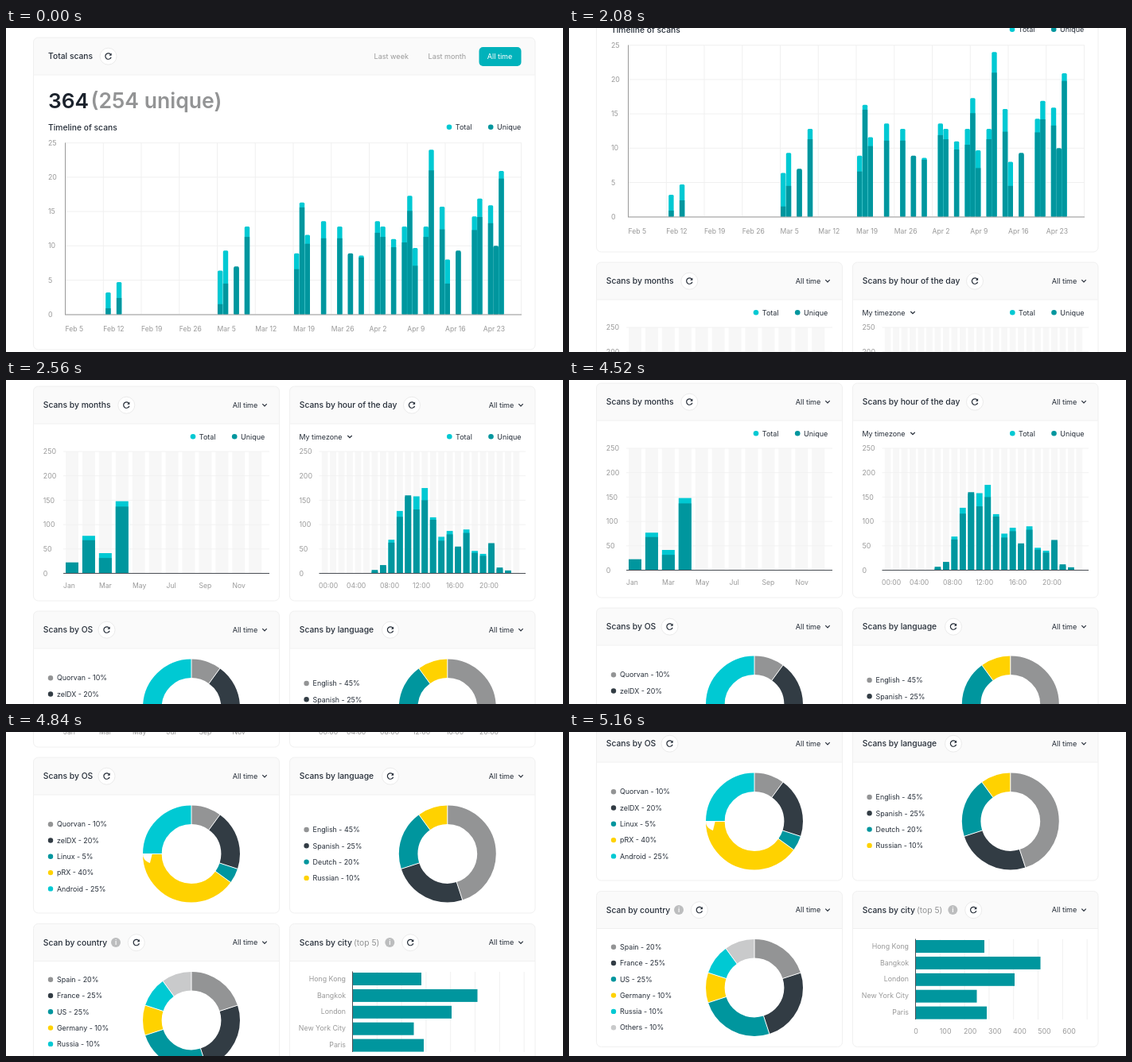
An HTML page for the animation above (6.72 s loop, 700 by 408 pixels).

```html
<!DOCTYPE html>
<html lang="en">
<head>
<meta charset="utf-8">
<title>Scan statistics</title>
<style>
  html, body { margin: 0; width: 100%; height: 100%; overflow: hidden; background: #fff; }
  svg { display: block; width: 700px; height: 408px; }
  text { font-family: Inter, "Open Sans", sans-serif; white-space: pre; }
</style>
</head>
<body>
<svg viewBox="0 0 700 408"><g id="page"></g></svg>
<script>
const CYAN = '#00c9d3', TEAL = '#00969e', YELLOW = '#ffd200', GRAY = '#939495',
      DARK = '#323c44', LIGHT = '#c9cacb', INK = '#252d38', LABEL = '#999', GRID = '#f0f0f0';
const PALETTE = [GRAY, DARK, TEAL, YELLOW, CYAN, LIGHT];
const page = document.getElementById('page');

function add(tag, attrs, content = '') {
  const el = document.createElementNS('http://www.w3.org/2000/svg', tag);
  for (const key in attrs) el.setAttribute(key, attrs[key]);
  el.textContent = content;
  page.append(el);
}
const rect = (x, y, width, height, fill, rx = 0) => add('rect', { x, y, width, height, fill, rx });
const circle = (cx, cy, r, fill, stroke = 'none') => add('circle', { cx, cy, r, fill, stroke });
const path = (d, stroke, width = 1, fill = 'none') => add('path', { d, stroke, fill, 'stroke-width': width });
const hline = (x1, x2, y, color) => path(`M${x1} ${y}H${x2}`, color);
const vline = (x, y1, y2, color) => path(`M${x} ${y1}V${y2}`, color);

// y is the middle of the capitals
function text(content, x, y, fill = LABEL, size = 8.8, weight = 400, anchor = 'start') {
  add('text', { x, y: y + size * 0.36, fill, 'font-size': size, 'font-weight': weight, 'text-anchor': anchor }, content);
}
const title = (content, x, y) => text(content, x, y, INK, 10.3, 500);

function chevron(x, y) {
  path(`M${x - 2.7} ${y - 1.3}l2.7 2.7l2.7 -2.7`, INK, 1.2);
}

function refresh(x, y) {
  circle(x, y, 10.5, '#fff', '#ebebeb');
  path(`M${x + 3.4} ${y - 1.8}A3.7 3.7 0 1 0 ${x + 3.6} ${y + 1}`, INK, 1.2);
  path(`M${x + 4.1} ${y - 4.2}v3.2h-3.2z`, 'none', 0, INK);
}

function info(x, y) {
  circle(x, y, 6, '#bcbdbe');
  text('i', x, y, '#fff', 8.5, 600, 'middle');
}

function card(x, y, width, height, name, refreshX) {
  rect(x, y, width, height, '#fff', 6);
  path(`M${x} ${y + 47}v-41q0 -6 6 -6h${width - 12}q6 0 6 6v41z`, 'none', 0, '#fafafa');
  hline(x, x + width, y + 47, GRID);
  add('rect', { x, y, width, height, rx: 6, fill: 'none', stroke: GRID });
  title(name, x + (width > 400 ? 18.5 : 12.3), y + 23.7);
  refresh(refreshX, y + 23.7);
}

function smallCard(right, y, height, name, refreshX) {
  const x = right ? 356.5 : 34.5;
  card(x, y, right ? 308.5 : 309, height, name, refreshX);
  text('All time', x + 250.2, y + 23.5, INK, 9.1);
  chevron(x + 290.5, y + 23.5);
}

function legend(x, y) {
  [['Total', CYAN], ['Unique', TEAL]].forEach(([name, color], i) => {
    circle(x + i * 52.2, y, 3.3, color);
    text(name, x + 7.8 + i * 52.2, y, INK, 9);
  });
}

function bar(x, base, width, total, unique, scale, radius) {
  rect(x, base - total * scale, width, total * scale, total > unique ? CYAN : TEAL, radius);
  rect(x, base - unique * scale + (total > unique ? 0 : 2), width,
       unique * scale - (total > unique ? 0 : 2), TEAL);
}

function timeline() {
  card(34.5, 12, 630.5, 393, 'Total scans', 128.5);
  text('Last week', 462.5, 35.7, LABEL, 9.1);
  text('Last month', 530.5, 35.7, LABEL, 9.1);
  rect(594.5, 24, 53, 24, '#00b2bb', 5);
  text('All time', 604.7, 35.7, '#fff', 9.1);
  text('364', 53, 91.5, '#1b222c', 26.3, 600);
  text('(254 unique)', 106.5, 91.5, GRAY, 26.6, 600);
  title('Timeline of scans', 53, 125);
  legend(557, 124.7);
  for (let i = 0; i <= 5; i++) {
    const y = 360.7 - i * 43.2;
    hline(74.5, 648, y, GRID);
    text(i * 5, 53, y);
  }
  const days = ['Feb 5', 'Feb 12', 'Feb 19', 'Feb 26', 'Mar 5', 'Mar 12',
                'Mar 19', 'Mar 26', 'Apr 2', 'Apr 9', 'Apr 16', 'Apr 23'];
  for (let i = 0; i <= 12; i++) {
    const x = 74.5 + i * 47.75;
    vline(x, 144.7, 360.7, GRID);
    if (days[i]) text(days[i], x, 379, LABEL, 8.6);
  }
  // left edge, total, unique
  const bars = [
    [125.2, 3.2, .9], [138.9, 4.7, 2.4], [266, 6.4, 1.5], [272.8, 9.3, 4.5], [286.3, 7, 7],
    [299.8, 12.8, 11.3], [362, 8.9, 6.6], [368.8, 16.3, 15.6], [375.6, 11.6, 10.3],
    [395.9, 13.6, 11.1], [416.2, 12.8, 11.1], [429.7, 8.9, 8.9], [443.3, 8.6, 8.3],
    [463.6, 13.6, 11.9], [470.4, 12.8, 11.3], [483.9, 11, 9.8], [497.5, 12.8, 10.5],
    [504.2, 17.3, 15.1], [511, 9.7, 7.1], [524.6, 12.8, 11.3], [531.3, 24, 21],
    [544.9, 15.7, 12.4], [551.6, 8, 4.5], [565.2, 9.3, 9.3], [585.5, 14.3, 12.3],
    [592.2, 16.9, 14.2], [605.8, 15.9, 13.3], [612.5, 10, 10], [619.3, 20.9, 19.8]
  ];
  for (const [x, total, unique] of bars) bar(x, 360.7, 6.4, total, unique, 8.64, 1.5);
  vline(74.5, 144.5, 361, '#999');
  hline(74, 648, 361, '#999');
}

function columnChart({ left, right, labelX, start, pitch, width, count, first, bars, ticks, tickX }) {
  const base = 653.5, scale = 0.614;
  for (let i = 0; i < count; i++) rect(start + i * pitch, base - 153.5, width, 153.5, '#f7f7f7');
  for (let i = 0; i <= 5; i++) {
    const y = base - i * 50 * scale;
    hline(left, right, y, '#f2f2f2');
    text(i * 50, labelX, y);
  }
  bars.forEach(([total, unique = total], i) =>
    bar(start + (first + i) * pitch, base, width, total, unique, scale, 0));
  hline(left, right, base, '#4a4f55');
  ticks.forEach((tick, i) => text(tick, tickX[i], 668.5, LABEL, 8.6));
}

function donut(cx, cy, shares) {
  const mid = 49.2, ring = 23.6;
  let sum = 0;
  const cuts = shares.map((share, i) => {
    add('circle', {
      cx, cy, r: mid, fill: 'none', stroke: PALETTE[i], 'stroke-width': ring, pathLength: 100,
      'stroke-dasharray': `${share} ${100 - share}`, 'stroke-dashoffset': -sum,
      transform: `rotate(-90 ${cx} ${cy})`
    });
    const angle = sum * Math.PI / 50;
    sum += share;
    const point = r => `${cx + r * Math.sin(angle)} ${cy - r * Math.cos(angle)}`;
    return `M${point(37)}L${point(61.5)}`;
  });
  path(cuts.join(''), '#fff');
}

function donutPanel(x, legendY, cx, cy, items) {
  items.forEach(([name, share], i) => {
    const y = legendY + i * 20.3;
    circle(x, y, 3.2, PALETTE[i]);
    text(`${name} - ${share}%`, x + 8, y, INK, 8.9);
  });
  donut(cx, cy, items.map(item => item[1]));
}

function cityChart() {
  for (let i = 0; i <= 7; i++) vline(435.5 + i * 30.8, 971, 1072, GRID);
  [['Hong Kong', 86.5], ['Bangkok', 157], ['London', 124.5], ['New York City', 77], ['Paris', 89.5]]
    .forEach(([city, width], i) => {
      const y = 980 + i * 20.9;
      rect(435.5, y - 8, width, 16, TEAL);
      text(city, 427, y - .5, LABEL, 8.8, 400, 'end');
    });
  vline(435.5, 970.5, 1072, '#4a4f55');
  for (let i = 0; i <= 6; i++) text(i * 100, i ? 442 + i * 31.1 : 436, 1087, LABEL, 8.8, 400, 'middle');
}

timeline();

smallCard(false, 418, 270, 'Scans by months', 151.3);
legend(235, 481.3);
columnChart({
  left: 72, right: 331, labelX: 46.8, start: 75, pitch: 20.93, width: 16, count: 12, first: 0,
  bars: [[22.5], [77, 68], [41.5, 31.5], [148, 137]],
  ticks: ['Jan', 'Mar', 'May', 'Jul', 'Sep', 'Nov'], tickX: [72, 117, 159, 201.5, 242.5, 284.5]
});

smallCard(true, 418, 270, 'Scans by hour of the day', 510);
text('My timezone', 368.5, 481.3, INK, 8.9);
chevron(432, 481.3);
legend(557.3, 481.3);
columnChart({
  left: 393.5, right: 653, labelX: 368.5, start: 396.7, pitch: 10.47, width: 7.8, count: 24, first: 6,
  bars: [[7], [17], [69, 63], [128, 116], [160], [158, 131], [175, 150], [115, 110], [75, 67],
         [87, 80], [55], [90, 83], [46, 42], [40, 36], [62], [12], [6]],
  ticks: ['00:00', '04:00', '08:00', '12:00', '16:00', '20:00'], tickX: [393, 428, 470, 511, 553, 595]
});

smallCard(false, 701, 196, 'Scans by OS', 126.5);
donutPanel(56, 785.2, 233, 822.5, [['Quorvan', 10], ['zelDX', 20], ['Linux', 5], ['pRX', 40], ['Android', 25]]);

smallCard(true, 701, 196, 'Scans by language', 483);
donutPanel(377.6, 792, 554.8, 822.5, [['English', 45], ['Spanish', 25], ['Deutch', 20], ['Russian', 10]]);

smallCard(false, 910.5, 196, 'Scan by country', 163.8);
info(138, 934);
donutPanel(56, 980.7, 233, 1032, [['Spain', 20], ['France', 25], ['US', 25], ['Germany', 10], ['Russia', 10], ['Others', 10]]);

smallCard(true, 910.5, 196, 'Scans by city', 508.2);
text('(top 5)', 437, 934.2, GRAY, 10.3);
info(482.3, 934);
cityChart();

// cubic-bezier(.5, 0, 0, 1)
function ease(x) {
  let low = 0, high = 1;
  for (let i = 0; i < 30; i++) {
    const s = (low + high) / 2;
    if (1.5 * s * (1 - s) ** 2 + s ** 3 < x) low = s; else high = s;
  }
  return low * low * (3 - 2 * low);
}

const LOOP = 6720, STEP = 40;
const scrolls = [
  { begin: 1960, end: 2560, lead: 63, duration: 681, distance: 410 },
  { begin: 4520, end: 5160, lead: 67, duration: 751, distance: 300 }
];

function scrollAt(time) {
  const t = Math.floor(time / STEP) * STEP;
  let y = 0;
  for (const { begin, end, lead, duration, distance } of scrolls) {
    if (t >= end) y += distance;
    else if (t >= begin) y += Math.round(distance * ease((t - begin + lead) / duration));
  }
  return y;
}

const origin = performance.now();
function draw() {
  const time = (performance.now() - origin) % LOOP;
  page.setAttribute('transform', `translate(0 ${-scrollAt(time)})`);
  requestAnimationFrame(draw);
}
draw();
</script>
</body>
</html>
```
